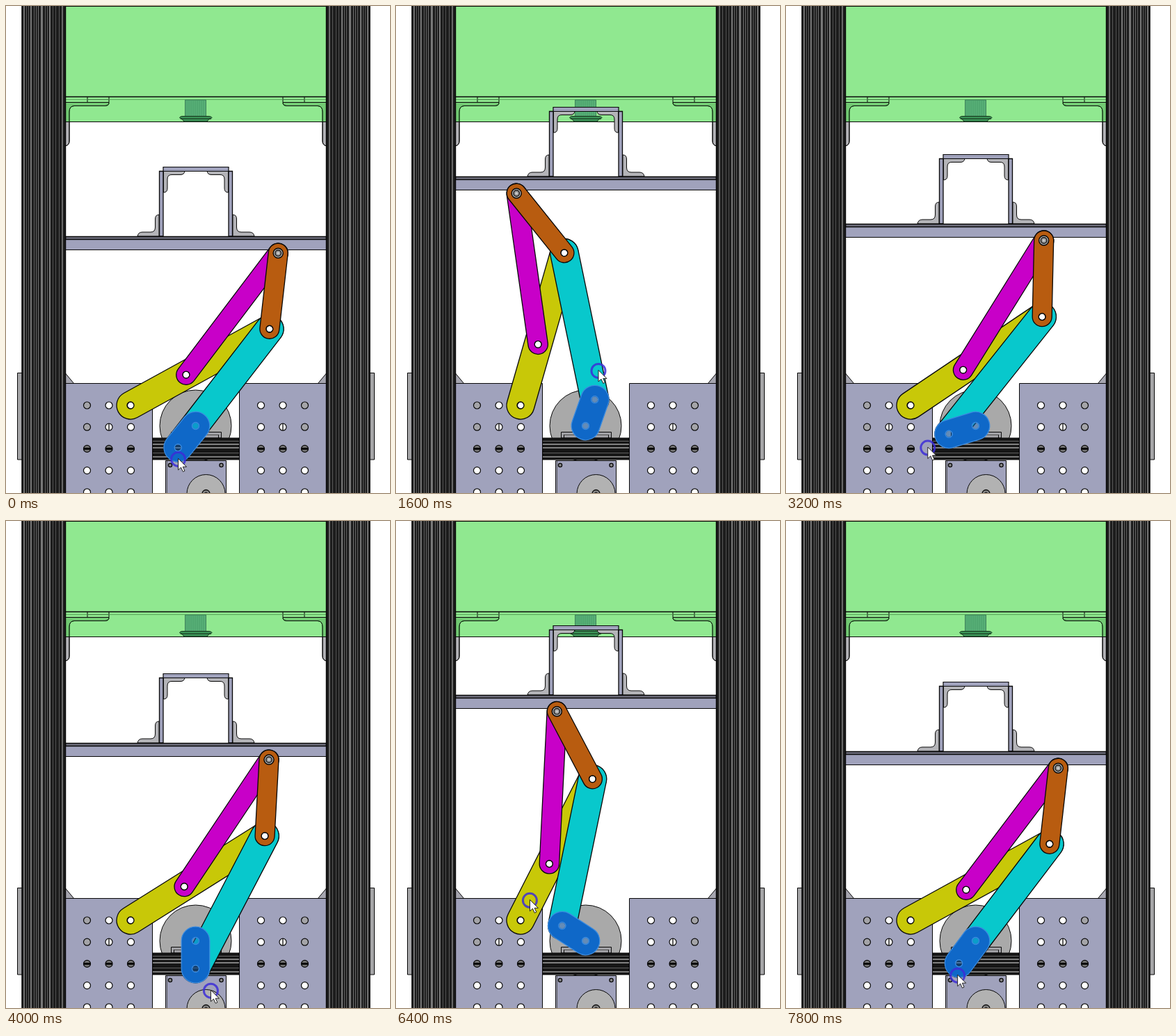
Animation, 552 px wide and 700 px high, one loop 7900 ms. Source, as an HTML page with a canvas:

```html
<!DOCTYPE html>
<html lang="en">
<head>
<meta charset="utf-8">
<title>Linkage lift</title>
<style>
html, body { margin: 0; width: 100%; height: 100%; overflow: hidden; background: #fff; }
canvas { display: block; }
</style>
</head>
<body>
<canvas id="stage" width="552" height="700"></canvas>
<script>
const ctx = document.getElementById('stage').getContext('2d');
const LOOP = 7900, STEP = 100, TAU = Math.PI * 2, RAD = Math.PI / 180;
const PLATE = '#a0a2bc', STEEL = '#b4b4b8', INK = '#080808';

// Linkage geometry
const HUB = { x: 272.5, y: 603.5 }, PIVOT = { x: 179, y: 574 };
const CRANK = 40.1, COUPLER = 215.3, ROCKER = 228;
const ARM = 304.8, ARM_TURN = -17.1 * RAD;

// time, crank angle
const SPIN = [[0, 129], [900, 3.5], [2400, -142], [3200, -197], [4000, -270], [4800, -362],
  [5000, -373.5], [6400, -507], [7200, -548], [7800, -593.5], [7900, -591]];
// time, pointer distance from hub
const REACH = [[0, 54], [900, 84], [2400, 77], [4000, 75], [5000, 81], [6400, 99], [7800, 56], [7900, 54]];
// time, pointer angle ahead of the crank
const LEAD = [[0, -11.5], [900, -12.5], [2400, 1.7], [4000, -17], [5000, -12], [6400, 3], [7800, -9], [7900, -11.5]];

// Monotone cubic through a table of [time, value]
function sample(table, t) {
  let i = 0;
  while (i < table.length - 2 && t >= table[i + 1][0]) i++;
  const slope = k => (table[k + 1][1] - table[k][1]) / (table[k + 1][0] - table[k][0]);
  const tangent = k => {
    if (k === 0 || k === table.length - 1) return 0;
    const a = slope(k - 1), b = slope(k);
    return a * b <= 0 ? 0 : 2 * a * b / (a + b);
  };
  const [t0, v0] = table[i], [t1, v1] = table[i + 1];
  const d = t1 - t0, u = (t - t0) / d, u2 = u * u, u3 = u2 * u;
  return v0 * (2 * u3 - 3 * u2 + 1) + v1 * (3 * u2 - 2 * u3) +
    d * (tangent(i) * (u3 - 2 * u2 + u) + tangent(i + 1) * (u3 - u2));
}

const polar = (c, r, a) => ({ x: c.x + r * Math.cos(a), y: c.y + r * Math.sin(a) });

function solve(t) {
  const angle = sample(SPIN, t) * RAD;
  const pin = polar(HUB, CRANK, angle);
  const dx = pin.x - PIVOT.x, dy = pin.y - PIVOT.y, d = Math.hypot(dx, dy);
  const inner = (ROCKER ** 2 - COUPLER ** 2 + d * d) / (2 * d * ROCKER);
  const swing = Math.atan2(dy, dx) - Math.acos(inner);
  return {
    pin,
    elbow: polar(PIVOT, ROCKER, swing),
    mid: polar(PIVOT, ROCKER * 0.4, swing),
    top: polar(PIVOT, ARM, swing + ARM_TURN),
    pointer: polar(HUB, sample(REACH, t), angle + sample(LEAD, t) * RAD)
  };
}

// Drawing helpers
function paint(fill, stroke = INK, width = 1) {
  if (fill) { ctx.fillStyle = fill; ctx.fill('evenodd'); }
  if (stroke) { ctx.strokeStyle = stroke; ctx.lineWidth = width; ctx.stroke(); }
}
function box(x0, y0, x1, y1, fill, stroke, width) {
  ctx.beginPath();
  ctx.rect(x0, y0, x1 - x0, y1 - y0);
  paint(fill, stroke, width);
}
function disc(x, y, r, fill, stroke, width) {
  ctx.beginPath();
  ctx.arc(x, y, r, 0, TAU);
  paint(fill, stroke, width);
}
function line(x0, y0, x1, y1, color = INK, width = 1) {
  ctx.beginPath();
  ctx.moveTo(x0, y0);
  ctx.lineTo(x1, y1);
  paint(null, color, width);
}
function shape(d, fill, stroke = INK, width = 1) {
  const p = new Path2D(d);
  if (fill) { ctx.fillStyle = fill; ctx.fill(p); }
  ctx.strokeStyle = stroke;
  ctx.lineWidth = width;
  ctx.stroke(p);
}
// Runs a drawing as is, then mirrored about the centre line
function both(draw) {
  draw();
  ctx.save();
  ctx.translate(546, 0);
  ctx.scale(-1, 1);
  draw();
  ctx.restore();
}
function link(a, b, r, fill, holes, edge = INK) {
  const n = Math.atan2(b.y - a.y, b.x - a.x), q = Math.PI / 2;
  ctx.beginPath();
  ctx.arc(a.x, a.y, r, n + q, n - q);
  ctx.arc(b.x, b.y, r, n - q, n + q);
  ctx.closePath();
  for (const h of holes) {
    ctx.moveTo(h.x + 5, h.y);
    ctx.arc(h.x, h.y, 5, 0, TAU);
  }
  paint(fill, edge, 1.3);
}

function post() {
  box(23, -2, 85.5, 702, '#1c1c1c', INK, 1.5);
  const bands = [[25, 2, '#707070'], [29, 1, '#585858'], [32, 1, '#5c5c5c'], [35, 2, '#787878'],
    [40, 1, '#606060'], [43, 1, '#686868'], [46, 1, '#707070'], [50, 3, '#787878'], [56, 1, '#606060'],
    [59, 1, '#606060'], [62, 2, '#787878'], [67, 1, '#505050'], [71, 1, '#505050'], [76, 1, '#585858'],
    [80, 2, '#686868']];
  for (const [x, w, c] of bands) { ctx.fillStyle = c; ctx.fillRect(x, 0, w, 700); }
}

function base() {
  disc(272.5, 603.5, 51.5, '#a9a9a9', INK);
  box(237.5, 612.5, 309.5, 621, '#a0a0a4');
  line(241.5, 616, 241.5, 621);
  line(305.5, 616, 305.5, 621);
  line(241.5, 616.5, 305.5, 616.5, '#555');

  box(211, 621, 335, 652, '#161616', INK);
  for (const [y, h, c] of [[625, 1, '#686868'], [629, 2, '#808080'], [634, 2, '#808080'], [642, 1, '#606060'],
    [647, 2, '#787878']]) {
    ctx.fillStyle = c;
    ctx.fillRect(211, y, 124, h);
  }

  box(229.5, 653.5, 316.5, 702, PLATE);
  line(231.5, 654, 231.5, 700, '#555');
  for (const x of [236, 309.5]) disc(x, 660, 2.6, '#888', INK, 1.3);
  disc(287.5, 701, 27.5, '#b2b2b2');
  disc(287.5, 701, 5.5, '#888', INK, 1.3);
  disc(287.5, 701, 2.5, '#222', null);

  both(() => {
    box(16.5, 527.5, 24, 652, '#a6a6a8');
    shape('M85.5 528 L98 543 H85.5 Z', '#a6a6b0');
    box(85.5, 542.5, 210.5, 702, PLATE);
    [116.5, 148, 179.5].forEach((x, col) => {
      for (let row = 0; row < 5; row++) {
        const y = 574 + row * 31.2;
        const dull = col === 0 && row < 2;
        disc(x, y, 5, row === 2 ? '#777' : dull ? '#a4a4a8' : '#fff', INK, 1.2);
        if (row === 2) line(x - 5, y, x + 5, y, INK, 3);
        if (row === 1 && col === 1) line(x, y - 5, x, y + 5, INK, 1.3);
      }
    });
  });
}

// Green housing with its corner brackets and the plunger under it
function hood() {
  const bracket = 'M85.5 138.5 H148 V140 Q147 143.5 143 143.5 H98 Q91 144 91 152 V194 Q91 200 85.5 201 Z';
  both(() => shape(bracket, STEEL));
  ctx.fillStyle = 'rgba(70,217,70,.6)';
  ctx.fillRect(85, 0, 375, 166);
  both(() => {
    shape(bracket, null);
    line(117, 134.5, 148, 134.5);
    line(117, 131, 117, 138);
    line(148, 131, 148, 138);
  });
  line(85, 0.5, 460, 0.5);
  line(85, 130.5, 460, 130.5, INK, 1.3);
  line(85, 134.5, 460, 134.5, '#4a944a', 0.8);
  line(85, 166.5, 460, 166.5);

  box(257.5, 135, 287.5, 159, '#58b078', '#3c8058');
  for (let x = 260; x < 287; x += 3) line(x, 135, x, 158, '#489c66', 0.8);
  shape('M249.5 160.5 Q250 158.5 254 158.5 H291 Q295.5 158.5 296 160.5 Q295.5 162 292 162.5 L289 166 H256 L253 162.5 Q250 162 249.5 160.5 Z',
    '#3c9458', '#123018');
  line(251, 162, 295, 162, '#123018', 1.2);
}

// Drawn at its lowest position, then shifted
function carriage(dy) {
  ctx.save();
  ctx.translate(0, dy);
  box(226, 231.5, 320, 237.5, PLATE, INK, 1.2);
  line(220, 237.5, 326, 237.5);
  both(() => {
    box(220.5, 237.5, 226, 331, PLATE, INK, 1.3);
    shape('M226.5 237.5 H257 Q256 242.5 251 242.5 H238 Q232 242.5 232 249 V262 Q232 268 226.5 268 Z', STEEL);
    shape('M220 300 Q214.5 300 214.5 306 V318 Q214.5 325 208 325 H196 Q190 325 189 331 H220 Z', STEEL);
  });
  box(85.5, 331.5, 460.5, 350.5, PLATE);
  box(85.5, 331.5, 460.5, 335.5, '#70707e', INK, 1.5);
  ctx.restore();
}

function pointer(p) {
  disc(p.x, p.y, 10, null, 'rgba(60,45,215,.85)', 3);
  ctx.save();
  ctx.translate(p.x, p.y - 1);
  shape('M0 0 V16.5 L4 12.8 L6.8 19 L9.4 17.8 L6.7 12 H12 Z', '#fff', '#222');
  ctx.restore();
}

function draw(t) {
  const { pin, elbow, mid, top, pointer: hand } = solve(t);
  ctx.fillStyle = '#fff';
  ctx.fillRect(0, 0, 552, 700);

  base();
  hood();
  carriage(Math.round(top.y - 355));
  both(post);

  link(PIVOT, elbow, 20, '#c8c808', [PIVOT, mid, elbow]);
  link(pin, elbow, 20.3, '#08c8cc', [pin, elbow]);
  link(mid, top, 14.2, '#c800c8', [mid]);
  link(top, elbow, 14, '#b85c10', [elbow]);
  disc(top.x, top.y, 7, '#b4b4b4', INK, 1.5);
  disc(top.x, top.y, 4.3, '#8c8c8c', INK, 1.2);
  disc(top.x, top.y, 2, '#c8c8c8', null);

  link(HUB, pin, 20.3, '#0f68c8', [HUB, pin], '#3c8ce0');
  for (const h of [HUB, pin]) disc(h.x, h.y, 5, 'rgba(15,104,200,.45)', '#3c8ce0');
  if (pin.x > 308) {
    line(302, 605.5, 308, 605.5, '#4c98e4', 0.8);
    line(305, 602.5, 305, 608.5, '#4c98e4', 0.8);
  }
  pointer(hand);
}

const start = performance.now();
function tick() {
  const t = (performance.now() - start) % LOOP;
  draw(Math.floor(t / STEP) * STEP);
  requestAnimationFrame(tick);
}
tick();
</script>
</body>
</html>
```
